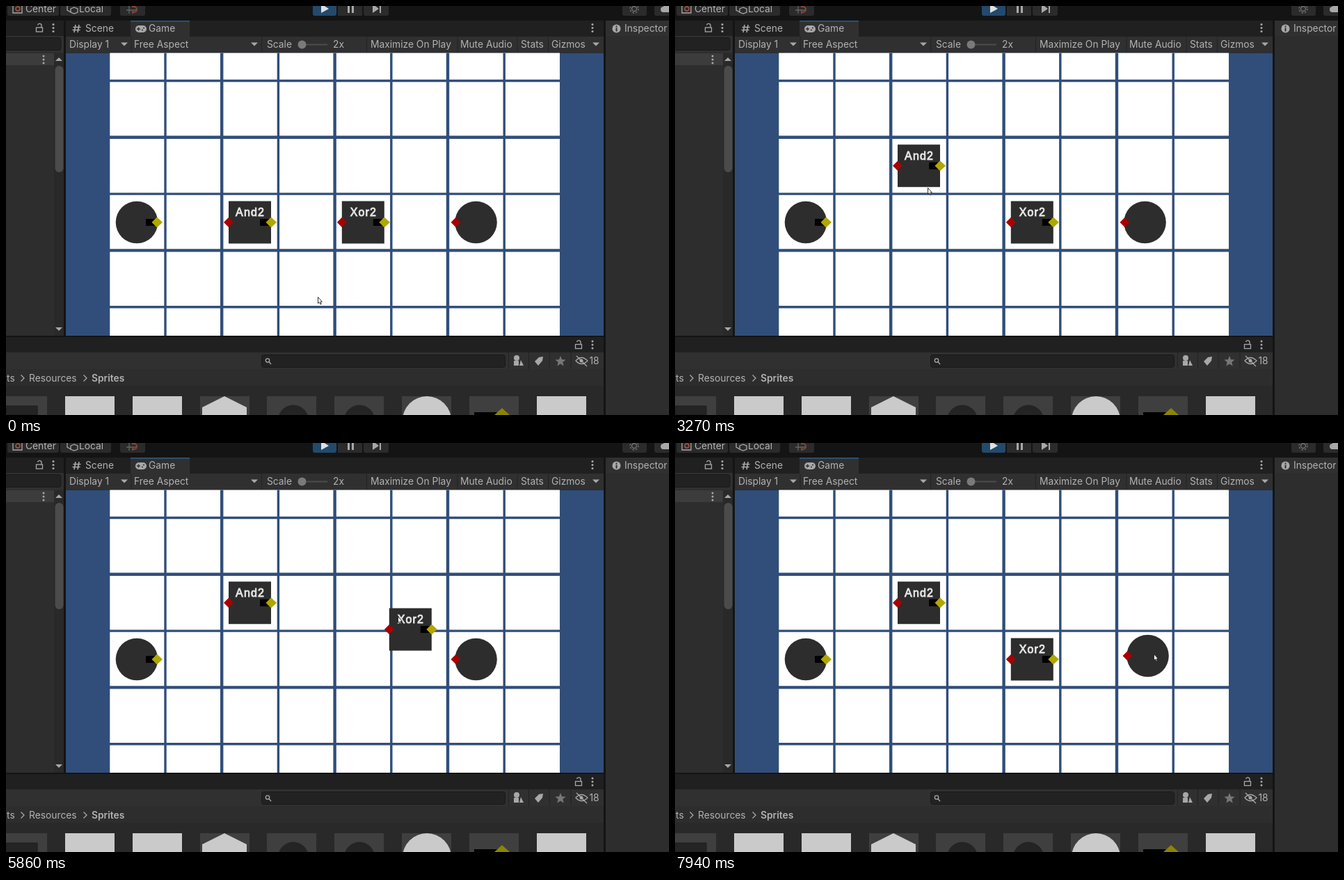
Animation, 953 px wide and 588 px high, one loop 8 s. Source, as an HTML page:

```html
<!DOCTYPE html>
<html lang="en">
<head>
<meta charset="utf-8">
<title>Logic grid editor</title>
<style>
  html, body { margin: 0; width: 100%; height: 100%; overflow: hidden; background: #141414; }
  svg { display: block; }
  text { font: 13.8px Inter, Roboto, sans-serif; fill: #b2b2b2; }
  .gate { font: 16px "Liberation Sans", Arial, sans-serif; letter-spacing: 1.1px; text-anchor: middle;
    fill: #e6e6e6; stroke: #e6e6e6; stroke-width: .9; }
  .icon { fill: #a8a8a8; }
  .line { fill: none; stroke: #a8a8a8; stroke-width: 1.3; }
</style>
</head>
<body>
<svg width="953" height="588" viewBox="0 0 953 588">
  <defs>
    <g id="dots" class="icon"><circle cy="-5" r="1.5"/><circle r="1.5"/><circle cy="5" r="1.5"/></g>
    <g id="lock"><rect class="line" x="-4.5" y="-1" width="9" height="6"/><path class="line" d="M-2.5-4.5a2.8 2.8 0 0 1 5.5 1V-1"/></g>
    <path id="down" class="icon" d="M-5-2.5H5L0 2.5Z"/>
    <path id="more" class="line" d="M-2.5-4.5L2 0L-2.5 4.5"/>
    <path id="red" d="M-7 0L0-7L7 0L0 7Z" fill="#a80000"/>
    <g id="out"><path d="M-16-5H-3V5H-16Z"/><path d="M-7.5 0L0-7.5L8 0L0 7.5Z" fill="#b0a700"/></g>
    <g id="box"><path d="M-30.5-30.5H30.5V30.5H-30.5Z" fill="#2d2d2d"/><use href="#red" x="-30.5"/><use href="#out" x="30.5"/></g>
  </defs>

  <!-- main toolbar -->
  <g fill="#2b2b2b">
    <rect x="2" y="-9" width="74" height="23" rx="3"/><rect x="78" y="-9" width="73" height="23" rx="3"/>
    <rect x="164" y="-9" width="36" height="23" rx="3"/>
    <rect x="477" y="-9" width="35" height="23"/><rect x="514" y="-9" width="36" height="23" rx="3"/>
    <rect x="441" y="-9" width="34" height="23" rx="3" fill="#234a6c"/>
    <rect x="886" y="-9" width="35" height="23" rx="3"/><rect x="932" y="-9" width="40" height="23" rx="3"/>
  </g>
  <text x="28" y="8.5">Center</text><text x="105" y="8.5">Local</text>
  <path class="line" d="M10-2V10H23V-2M88 0V6L95 10M93 4L98 2L103 4V9L98 11L93 9Z"/>
  <circle cx="17" cy="4" r="3" fill="none" stroke="#b45a42" stroke-width="1.3"/>
  <path class="line" d="M173 6H188M177-2V11M182 7V11" style="stroke:#666"/>
  <path d="M181 1h3a3 3 0 0 1 0 8h-3" fill="none" stroke="#8b4335" stroke-width="2"/>
  <path d="M453-3L464 4L453 10Z" fill="#e0e0e0"/>
  <path class="icon" d="M491-2h3V10h-3ZM497-2h3V10h-3ZM527-3L536 4L527 10ZM537-2h2V10h-2Z"/>
  <g class="line" style="stroke:#777"><circle cx="903" cy="4" r="3.5"/><circle cx="903" cy="4" r="6" stroke-dasharray="2.4 2.3"/></g>
  <path class="icon" d="M945 9a4 4 0 0 1 0-8a6 6 0 0 1 8-4V9Z"/>

  <!-- hierarchy panel -->
  <path d="M0 21H83V474H0Z" fill="#2d2d2d"/>
  <path d="M0 21H83V43H0Z" fill="#202020"/><path d="M0 43H83V67H0Z" fill="#303030"/>
  <rect x="-9" y="45.5" width="88" height="18" rx="3" fill="#222" stroke="#191919"/>
  <path d="M0 68H69V85H0Z" fill="#3c3c3c"/><path d="M69 68H83V474H69Z" fill="#292929"/>
  <rect x="70.5" y="86" width="12" height="153" rx="6" fill="#4b4b4b"/>
  <use href="#lock" x="48" y="32"/><use href="#dots" x="68" y="31.5"/><use href="#dots" x="54" y="77"/>
  <use href="#down" transform="translate(76 76.5) scale(1 -1)"/><use href="#down" x="76" y="464.5"/>

  <!-- game view -->
  <path d="M86 21H859V44H86Z" fill="#202020"/><path d="M86 44H859V67H86Z" fill="#303030"/>
  <path d="M179 21H264V44H179Z" fill="#303030"/><path d="M179 21H264V22.6H179Z" fill="#2b5c8a"/>
  <path class="line" d="M100 27L98 38M105 27L103 38M96.5 30.5H107.5M95.5 34.5H106.5" style="stroke-width:1.6"/>
  <rect class="icon" x="186" y="28" width="16" height="10" rx="5"/>
  <path d="M188 33h5M190.5 30.5v5M197 31.5h2M195 34.5h2" stroke="#303030" stroke-width="1.4"/>
  <text x="114" y="37">Scene</text><text x="205" y="37">Game</text><use href="#dots" x="843" y="31.5"/>
  <path d="M180 44V67M367.5 44V67M518.5 44V67M649 44V67M735 44V67M779.5 44V67" stroke="#222"/>
  <text x="91" y="59.8">Display 1</text><text x="184" y="59.8">Free Aspect</text>
  <text x="375" y="59.8">Scale</text><text x="470" y="59.8">2x</text>
  <text x="524" y="59.8">Maximize On Play</text><text x="653" y="59.8">Mute Audio</text>
  <text x="740" y="59.8">Stats</text><text x="784" y="59.8">Gizmos</text>
  <use href="#down" x="170" y="55"/><use href="#down" x="357" y="55"/><use href="#down" x="848" y="55"/>
  <path d="M420 55.5H462" stroke="#4c4c4c" stroke-width="2"/><circle cx="425.5" cy="55.5" r="6" fill="#7a7a7a"/>
  <path d="M86 67.5H859V474H86Z" fill="#304e79"/><path d="M149.3 67.5H796V474H149.3Z" fill="#fff"/>
  <g id="grid" stroke="#304e79"></g>

  <!-- project panel -->
  <path d="M0 476H859V588H0Z" fill="#292929"/><path d="M0 476H859V498H0Z" fill="#202020"/>
  <path d="M0 498H859V522H0Z" fill="#303030"/><path d="M0 522H859V546H0Z" fill="#2d2d2d"/>
  <use href="#lock" x="823" y="487.5"/><use href="#dots" x="843" y="487"/>
  <rect x="367.5" y="501.5" width="350" height="18" rx="3" fill="#222" stroke="#191919"/>
  <circle class="line" cx="376" cy="509.5" r="2.7"/><path class="line" d="M378 511.5L381 515"/>
  <path d="M722.5 498V522M751.5 498V522M781 498V522M812 498V522" stroke="#222"/>
  <circle class="icon" cx="734" cy="506" r="4"/><path class="icon" d="M730 510H737V517H730ZM740 509L744 517H738Z"/>
  <path class="icon" d="M760 511L766 505L772 504L771 510L765 517Z"/>
  <path id="star" fill="#777"/>
  <path class="line" d="M819 510Q827 501 836 510Q827 519 819 510ZM820 503L835 518"/><circle class="icon" cx="827" cy="510" r="2.5"/>
  <text x="838.5" y="515">18</text>
  <text x="1" y="539.5">ts</text><text x="33" y="539.5">Resources</text>
  <text x="123" y="539.5" style="font-weight:600">Sprites</text>
  <use href="#more" x="24" y="535"/><use href="#more" x="114" y="535"/>
  <g id="thumbs"></g>
  <path d="M0 575H45V588H0Z" fill="#242424" stroke="#1c1c1c"/>
  <path d="M282 588V577L314 561L346 577V588Z" fill="#cacaca"/>
  <g fill="#242424"><circle cx="413" cy="595.5" r="22"/><circle cx="508" cy="595.5" r="22"/></g>
  <circle cx="605" cy="596" r="35" fill="#cacaca"/>
  <path d="M673 584H712V588H673Z"/><path d="M702 588L713 578L724 588Z" fill="#8c8500"/>

  <!-- inspector -->
  <path d="M862 21H953V588H862Z" fill="#2d2d2d"/><path d="M862 21H953V43H862Z" fill="#303030"/>
  <circle class="icon" cx="877.5" cy="32.5" r="6"/><path d="M877.5 28.5v2M877.5 31.5v5" stroke="#303030" stroke-width="2"/>
  <text x="889" y="37">Inspector</text>

  <!-- circuit -->
  <circle cx="188" cy="311" r="30.3" fill="#2d2d2d"/><use href="#out" x="217" y="311"/>
  <g id="lamp"><circle cx="675.5" cy="311" r="30.3" fill="#2d2d2d"/><use href="#red" x="646.5" y="311"/></g>
  <g id="and"><use href="#box" x="350.5" y="311"/><text class="gate" x="351" y="302">And2</text></g>
  <g id="xor"><use href="#box" x="513.3" y="311"/><text class="gate" x="513.8" y="302">Xor2</text></g>
  <path id="cursor" d="M.5.5V9.5L2.5 7.8L4 11L5.3 10.4L4 7.2H6.4Z" fill="#fff" stroke="#222" stroke-width=".9"/>
</svg>
<script>
const $ = id => document.getElementById(id);
const CELL = 81.3, LOOP = 8000, STEP = 140;

// Grid lines alternate between thin and thick
for (let i = 0; i < 7; i++) {
  const x = 229 + i * 81.2, y = 107.5 + i * CELL, width = i % 2 ? 4.4 : 3.4;
  $('grid').innerHTML += `<path d="M${x} 67.5V474${y < 474 ? `M149 ${y}H796` : ''}" stroke-width="${width}"/>`;
}

for (let i = 0; i < 9; i++) {
  const x = Math.round(i * 96.85 - 12), fill = [1, 2, 8].includes(i) ? '#cacaca' : '#3f3f3f';
  $('thumbs').innerHTML += `<path d="M${x} 561h71v27h-71Z" fill="${fill}"/>`;
}

const star = Array.from({length: 10}, (_, i) => {
  const r = i % 2 ? 3.5 : 8, a = i * Math.PI / 5;
  return [797 + r * Math.sin(a), 511 - r * Math.cos(a)];
});
$('star').setAttribute('d', `M${star.join('L')}Z`);

// Pointer key points: step, x, y
const path = [[0, 448, 418], [7, 431, 399], [9, 431, 399], [16, 356, 323], [18, 357, 317], [23, 363, 261],
  [25, 410, 271], [28, 495, 292], [32, 495, 292], [33, 499, 283], [38, 513, 273], [39, 523, 296],
  [41, 563, 249], [43, 572, 226], [45, 584, 243], [49, 524, 305], [51, 505, 325], [55, 684, 308], [56, 688, 303]];

// Part, grab step, drop step
const drags = [['and', 18, 23], ['xor', 32, 43], ['xor', 45, 51], ['lamp', 55, 57]];

function pointer(n) {
  const i = Math.max(1, path.findIndex(p => p[0] >= n));
  const [n0, x0, y0] = path[i - 1], [n1, x1, y1] = path[i];
  const k = (n - n0) / (n1 - n0);
  return [x0 + (x1 - x0) * k, y0 + (y1 - y0) * k];
}

const snap = v => Math.round(v / CELL) * CELL;
const move = (id, pos) => $(id).setAttribute('transform', `translate(${pos})`);

function draw(now) {
  const n = Math.max(0, Math.floor((now % LOOP - 50) / STEP));
  const offsets = {and: [0, 0], xor: [0, 0], lamp: [0, 0]};
  for (const [id, grab, drop] of drags) {
    if (n < grab) break;
    const from = pointer(grab), to = pointer(Math.min(n, drop));
    const pos = offsets[id].map((v, i) => v + to[i] - from[i]);
    offsets[id] = n < drop ? pos : pos.map(snap);
  }
  for (const id in offsets) move(id, offsets[id]);
  move('cursor', pointer(n));
  requestAnimationFrame(draw);
}
draw(0);
</script>
</body>
</html>
```
